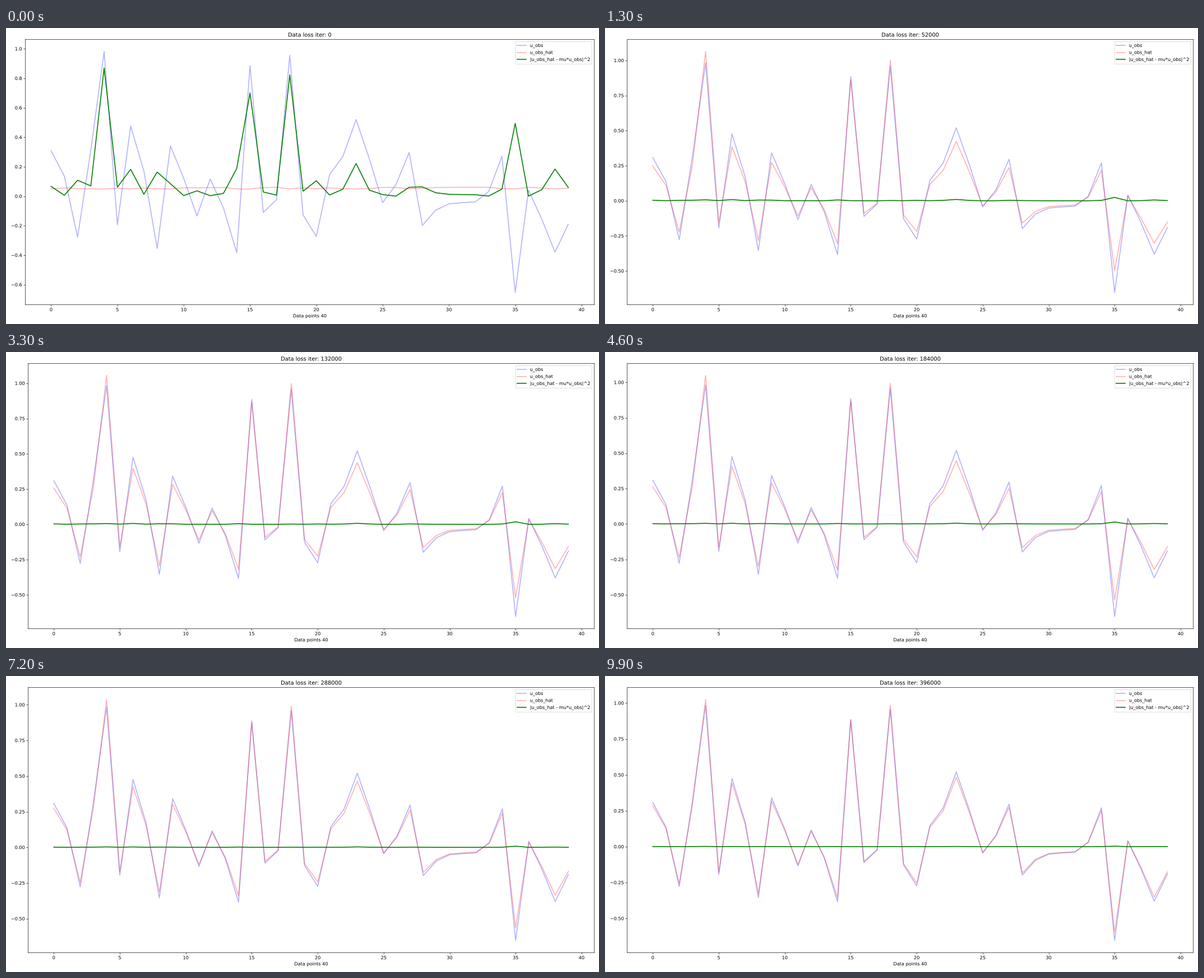
Recreate the animation shown at these times as a matplotlib script. Size 1058 by 529 pixels, loop 10000 ms.

```python
import numpy as np
import matplotlib.pyplot as plt
from matplotlib.animation import FuncAnimation
from matplotlib.patheffects import Normal
from matplotlib.text import Text
from matplotlib.ticker import MultipleLocator

W, H = 1058, 529
FRAMES, INTERVAL = 100, 100
ITERS_PER_FRAME = 4000
SETTLED = 13  # frame where the fast fit is over and the slow one goes on

plt.rcParams.update({"font.family": "DejaVu Sans", "font.size": 10,
                     "text.hinting": "none"})

# The measured points, in thousandths
observed = np.array([
    308, 136, -278, 314, 982, -194, 476, 170, -355, 341,
    122, -134, 116, -80, -384, 886, -111, -23, 956, -127,
    -273, 146, 269, 520, 254, -44, 78, 296, -198, -95,
    -52, -44, -38, 32, 271, -654, 41, -155, -380, -190]) / 1000


def prediction(i):
    """Nearly flat at first, then a fit that is too low except at the peaks."""
    p = (i - SETTLED) / (FRAMES - 1 - SETTLED)
    shrink = .2 + (.075 - .2) * p
    overshoot = .31 + (.13 - .31) * p
    fit = observed * (1 - shrink) + overshoot * observed ** 6
    flat = .049 + .012 * np.exp(-(observed / .2) ** 2)
    return fit + (flat - fit) * .35 ** i if i < SETTLED else fit


def place_axes(left, right=1049.3, top=20.4, bottom=494.4):
    ax.set_position([left / W, 1 - bottom / H,
                     (right - left) / W, (bottom - top) / H])


fig = plt.figure(figsize=(18, 9), dpi=H / 9, facecolor="white")
ax = fig.add_subplot()
x = np.arange(observed.size)
ax.plot(x, observed, "b", lw=2, alpha=.3, label="u_obs")
hat_line, = ax.plot(x, observed, "r", lw=2, alpha=.3, label="u_obs_hat")
loss_line, = ax.plot(x, observed, "g", lw=2, label="|u_obs_hat - mu*u_obs|^2")
ax.set_xlim(-1.95, 40.95)
ax.xaxis.set_major_locator(MultipleLocator(5))
ax.set_xlabel(f"Data points {observed.size}")
ax.legend(loc="upper right", labelspacing=.56)


def update(i):
    hat = prediction(i)
    hat_line.set_ydata(hat)
    loss_line.set_ydata((hat - observed) ** 2)

    low, high = observed.min(), max(observed.max(), hat.max())
    margin = .05 * (high - low)
    ax.set_ylim(low - margin, high + margin)

    # Two-decimal tick labels need a wider left margin
    wide = high > observed.max()
    ax.yaxis.set_major_locator(MultipleLocator(.25 if wide else .2))
    place_axes(39.4 if wide else 34.3)
    ax.set_title(f"Data loss iter: {i * ITERS_PER_FRAME}")

    # Outlined text keeps its place between whole pixels
    for text in fig.findobj(Text):
        text.set_path_effects([Normal()])
    return hat_line, loss_line


anim = FuncAnimation(fig, update, frames=FRAMES, interval=INTERVAL,
                     repeat=True, repeat_delay=0, blit=False)
plt.show()
```
